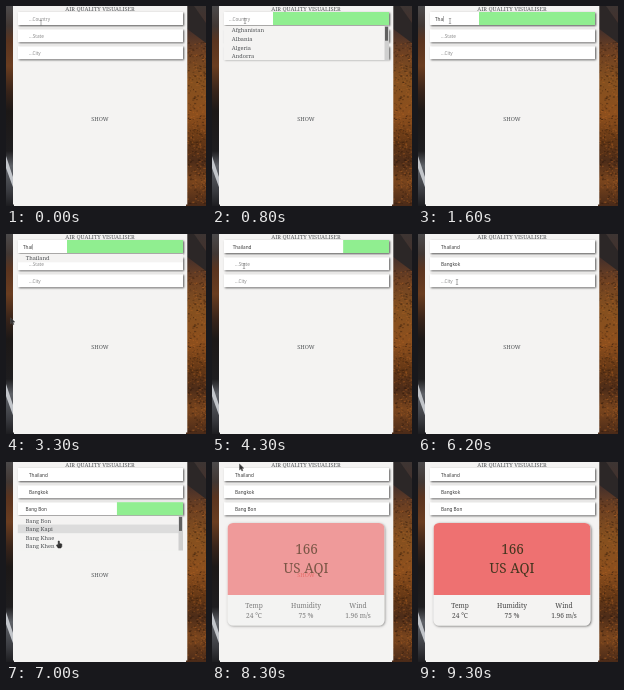
These frames come from a looping animation (200 px wide and 200 px high, 9400 ms). An HTML page with a canvas:

```html
<!DOCTYPE html>
<html lang="en">
<head>
<meta charset="utf-8">
<title>Air quality visualiser</title>
<style>
html, body { margin: 0; width: 100%; height: 100%; overflow: hidden; background: #f4f3f2; }
canvas { display: block; width: 100vw; height: 100vh; }
</style>
</head>
<body>
<canvas id="stage"></canvas>
<script>
const LOOP = 9400, STEP = 100;
const PANEL = '#f4f3f2', GREEN = '#90ee90', CORAL = '#ee7171', INK = '#505356';
const SERIF = '"Noto Serif", serif', SANS = '"Noto Sans", "Open Sans", sans-serif';
const canvas = document.getElementById('stage');
const ctx = canvas.getContext('2d');

const clamp = v => Math.max(0, Math.min(1, v));
const mix = (a, b, k) => a + (b - a) * k;

// CSS "ease" curve, solved by bisection
function ease(x) {
  x = clamp(x);
  if (x === 0 || x === 1) return x;
  const bez = (a, b, s) => 3 * a * s * (1 - s) ** 2 + 3 * b * s * s * (1 - s) + s ** 3;
  let lo = 0, hi = 1;
  for (let i = 0; i < 24; i++) {
    const mid = (lo + hi) / 2;
    if (bez(.25, .25, mid) < x) lo = mid; else hi = mid;
  }
  return bez(.1, 1, lo);
}

// Last entry whose time has come
const at = (steps, t) => steps.filter(s => s[0] <= t).pop()[1];

const fields = [
  {
    y: 6, hint: '...Country', focus: 150, blur: 4125,
    text: [[0, ''], [1100, 'T'], [1300, 'Th'], [1500, 'Tha'], [2800, 'Thai'], [4100, 'Thailand']],
    lists: [
      [300, 1100, ['Afghanistan', 'Albania', 'Algeria', 'Andorra']],
      [1100, 1300, ['Taiwan', 'Tajikistan', 'Thailand', 'Togo']],
      [1300, 1600, ['Thailand']],
      [2800, 4200, ['Thailand']]
    ]
  },
  {
    y: 23.2, hint: '...State', focus: 4925, blur: 5675,
    text: [[0, ''], [5700, 'Bangkok']],
    lists: [[5000, 5900, ['Amnat Charoen', 'Ang Thong', 'Bangkok', 'Bueng Kan']]]
  },
  {
    y: 40.2, hint: '...City', focus: 6250, blur: 6870,
    text: [[0, ''], [6900, 'Bang Bon']],
    lists: [[6400, 7200, ['Bang Bon', 'Bang Kapi', 'Bang Khae', 'Bang Khen']]]
  }
];

// time, x, y, shape
const pointer = [
  [0, 35, 17, 'beam'], [600, 34, 15, 'beam'], [1000, 32, 15, 'beam'], [2050, 32, 15, 'beam'],
  [2200, 17, 50, 'arrow'], [2300, 3, 87, 'arrow'], [2350, -9, 110, 'none'],
  [3150, -5, 104, 'arrow'], [3700, 30, 30, 'hand'], [3900, 33, 23, 'hand'],
  [4150, 33, 24, 'hand'], [4250, 32, 32, 'beam'], [4950, 32, 32, 'beam'],
  [5100, 35, 46, 'hand'], [5300, 39, 61, 'hand'], [5750, 39, 61, 'hand'],
  [6000, 39, 48, 'beam'], [6450, 39, 48, 'beam'], [6650, 44, 59, 'hand'],
  [6900, 45, 61, 'hand'], [7000, 53, 82, 'hand'], [7300, 90, 113, 'hand'],
  [7700, 92, 113, 'hand'], [7900, 66, 62, 'arrow'], [8100, 40, 14, 'arrow'],
  [8300, 27.5, 2, 'arrow'], [8500, 22, -9, 'none'], [9400, 22, -9, 'none']
];

function pointerAt(t) {
  let i = 0;
  while (i < pointer.length - 2 && pointer[i + 1][0] <= t) i++;
  const a = pointer[i], b = pointer[i + 1], k = clamp((t - a[0]) / (b[0] - a[0]));
  return { x: mix(a[1], b[1], k), y: mix(a[2], b[2], k), shape: a[3] };
}

function rect(x, y, w, h, fill) {
  ctx.fillStyle = fill;
  ctx.fillRect(x, y, w, h);
}

function label(str, x, y, size, color, family = SERIF, align = 'center') {
  ctx.font = `${size}px ${family}`;
  ctx.textAlign = align;
  ctx.fillStyle = color;
  ctx.fillText(str, x, y);
}

function shadow(on, blur = 2, alpha = .65) {
  ctx.shadowColor = on ? `rgba(0,0,0,${alpha})` : 'transparent';
  ctx.shadowBlur = on ? blur * scale : 0;
  ctx.shadowOffsetX = ctx.shadowOffsetY = on ? .8 * scale : 0;
}

function poly(points, fill, line) {
  ctx.beginPath();
  points.forEach(([x, y]) => ctx.lineTo(x, y));
  ctx.closePath();
  ctx.fillStyle = fill;
  ctx.fill();
  if (line) {
    ctx.strokeStyle = line;
    ctx.lineWidth = .5;
    ctx.stroke();
  }
}

function strip(x, w, stops) {
  const g = ctx.createLinearGradient(0, 0, 0, 200);
  stops.forEach(([p, c]) => g.addColorStop(p / 200, c));
  rect(x, 0, w, 200, g);
}

let seed = 7;
const rand = () => (seed = seed * 16807 % 2147483647) / 2147483647;

// Dry grass flecks
const flecks = Array.from({ length: 520 }, () => ({
  x: 181 + rand() * 19, y: 36 + rand() * 162, w: .6 + rand() * 1.6, h: .5 + rand(),
  color: rand() < .55 ? 'rgba(38,20,10,.4)' : 'rgba(190,108,42,.35)'
}));

function scenery() {
  strip(0, 8, [[0, '#4c4a4b'], [20, '#413733'], [35, '#5a341f'], [60, '#6a3d20'],
    [85, '#38241a'], [105, '#1c1817'], [145, '#1e1d1f'], [160, '#5f6268'], [185, '#3a3b40'], [200, '#1d1d20']]);
  poly([[0, 150], [8, 174], [8, 184], [0, 162]], '#c2c5ca');
  strip(180, 20, [[0, '#3d3533'], [25, '#46302a'], [45, '#6d4022'], [75, '#85501f'],
    [110, '#8d4f1d'], [135, '#643715'], [155, '#4d2c18'], [175, '#7a451d'], [200, '#4a2a18']]);
  poly([[180, 0], [188, 0], [200, 17], [200, 37], [180, 22]], '#2c2727');
  flecks.forEach(f => rect(f.x, f.y, f.w, f.h, f.color));
}

function drawField(f, t) {
  const on = ease((t - f.focus) / 500) - ease((t - f.blur) / 500);
  const edge = mix(177, 61, on), tx = mix(23, 17, on), base = f.y + 8.5;
  const value = at(f.text, t), focused = t >= f.focus && t < f.blur;
  shadow(true);
  rect(11.8, f.y, 165.2, 13, '#fff');
  shadow(false);
  if (on > .001) rect(edge, f.y, 177 - edge, 13, GREEN);
  label(value || f.hint, tx, base, 4.66, value ? '#3c3c3c' : '#8c8c8c', SANS, 'left');
  if (focused && (t - f.focus) % 1000 < 500) {
    const cx = value ? tx + ctx.measureText(value).width + .2 : tx;
    rect(cx, f.y + 4, .4, 5.6, '#444');
  }
}

function drawList(f, t, mouse) {
  const open = f.lists.find(l => t >= l[0] && t < l[1]);
  if (!open) return;
  const rows = open[2], top = f.y + 13.7, pitch = 8.65, h = rows.length * pitch;
  rect(11.8, top, 165.2, h, PANEL);
  let hover = Math.floor((mouse.y - top) / pitch);
  if (f.y > 40 && t >= 6900) hover = 1;
  rows.forEach((name, i) => {
    const y = top + i * pitch;
    if (i === hover && mouse.shape === 'hand') rect(11.8, y, 165.2, pitch, '#dcdcdc');
    label(name, 19.7, y + 6.6, 5.6, INK, SERIF, 'left');
  });
  if (rows.length > 3) {
    rect(172.5, top, 4.5, h, '#cfcfcf');
    rect(173, top + 1, 3, 14, '#606060');
  }
}

function drawCard(alpha) {
  if (alpha <= 0) return;
  const shape = new Path2D(), outside = new Path2D();
  shape.roundRect(15.5, 61, 157, 102.5, 5.5);
  outside.rect(0, 0, 200, 200);
  outside.addPath(shape);

  ctx.save();
  ctx.globalAlpha = alpha;
  // Keep the shadow out of the translucent body
  ctx.save();
  ctx.clip(outside, 'evenodd');
  shadow(true, 2.5, .6);
  ctx.fillStyle = PANEL;
  ctx.fill(shape);
  ctx.restore();

  ctx.save();
  ctx.clip(shape);
  rect(15.5, 61, 157, 72, CORAL);
  rect(15.5, 133, 157, 31, PANEL);
  ctx.restore();
  label('166', 94.5, 92, 13.5, '#44361f');
  label('US AQI', 94, 111, 13.5, '#44361f');
  [['Temp', '24 °C', 42], ['Humidity', '75 %', 94], ['Wind', '1.96 m/s', 146]].forEach(([a, b, cx]) => {
    label(a, cx, 146.3, 6.6, '#444');
    label(b, cx, 155.5, 6.6, '#444');
  });
  ctx.restore();
}

function drawPointer({ x, y, shape }) {
  if (shape === 'none') return;
  ctx.save();
  ctx.translate(x, y);
  if (shape === 'beam') {
    rect(-.3, -2.7, .6, 5.4, '#777');
    rect(-1.2, -3, 2.4, .5, '#777');
    rect(-1.2, 2.5, 2.4, .5, '#777');
  } else if (shape === 'hand') {
    poly([[-.8, -3], [.3, -3], [.5, -.6], [2.8, 0], [2.8, 2.5], [1.9, 4], [-.9, 4],
      [-2.6, 1.2], [-1.8, .6], [-.8, 1.4]], '#333', '#222');
  } else {
    poly([[0, 0], [0, 6], [1.4, 4.8], [2.4, 7], [3.4, 6.5], [2.5, 4.4], [4.3, 4.2]], '#333', '#555');
  }
  ctx.restore();
}

let scale = 1;

function draw(t) {
  const ratio = window.devicePixelRatio || 1;
  const w = Math.round(innerWidth * ratio), h = Math.round(innerHeight * ratio);
  if (canvas.width !== w || canvas.height !== h) {
    canvas.width = w;
    canvas.height = h;
  }
  scale = w / 200;
  ctx.setTransform(scale, 0, 0, h / 200, 0, 0);
  const mouse = pointerAt(t);
  const fade = ease((t - 7700) / 1500);

  scenery();
  rect(7, 0, 174.3, 198.5, PANEL);
  label('AIR QUALITY VISUALISER', 94, 5.4, 5.6, INK);
  fields.forEach(f => drawField(f, t));
  const hot = t >= 7300;
  drawCard(fade);
  ctx.globalAlpha = hot ? 1 - fade ** 2 : 1;
  label('SHOW', 94, 114.6, 5.6, hot ? '#e04a40' : INK);
  ctx.globalAlpha = 1;
  fields.forEach(f => drawList(f, t, mouse));
  drawPointer(mouse);
}

function tick() {
  draw(Math.floor(performance.now() % LOOP / STEP) * STEP);
  requestAnimationFrame(tick);
}
tick();
</script>
</body>
</html>
```
